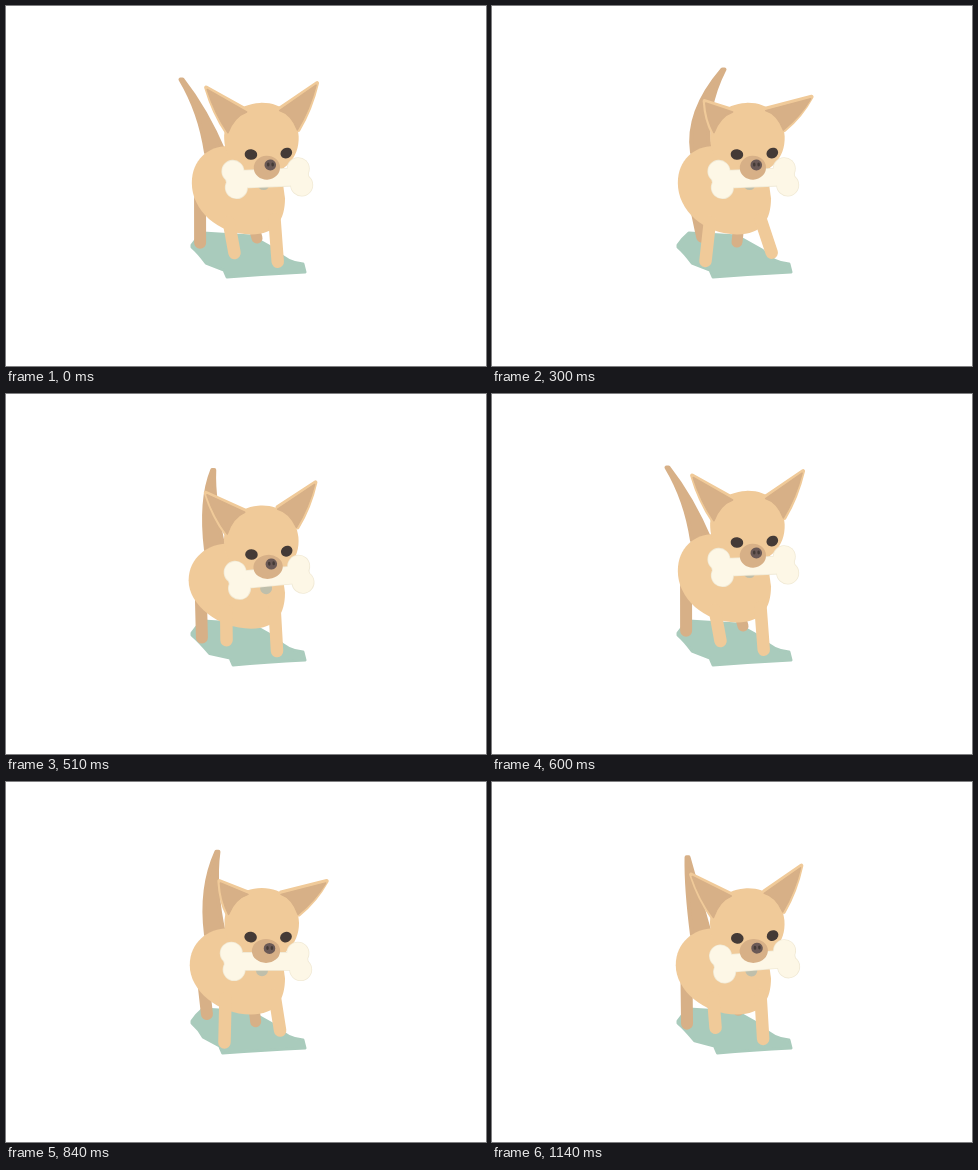
These frames come from a looping animation (480x360 px, 1170 ms). An HTML page with a canvas:

```html
<!DOCTYPE html>
<html lang="en">
<head>
<meta charset="utf-8">
<title>Walking dog</title>
<style>
html, body { margin: 0; width: 100%; height: 100%; overflow: hidden; background: #fff; }
canvas { display: block; }
</style>
</head>
<body>
<canvas id="stage" width="480" height="360"></canvas>
<script>
const ctx = document.getElementById('stage').getContext('2d');

const LOOP = 1170, STEP = 30, STRIDE = 20;
const FUR = '#f0ca99', TAN = '#d7b087', BONE = '#fdf7e6', RIM = '#f1ead6';
const SHADOW = '#a9cbbc', EYE = '#443a36', NOSE = '#6a5956', TAG = '#bfbfab';

// One stride swings the limbs once (swing, reach) and bobs the body twice.
let swing, reach, bob;

function setPhase(step) {
  const angle = 2 * Math.PI * step / STRIDE;
  swing = Math.sin(angle);
  reach = Math.cos(angle);
  bob = Math.cos(2 * angle - 0.44);
}
const move = (base, s, r, b = 0) => base + s * swing + r * reach + b * bob;

function paint(color, trace, edge = 0) {
  ctx.beginPath();
  trace();
  ctx.closePath();
  ctx.fillStyle = ctx.strokeStyle = color;
  ctx.fill();
  if (edge) {
    ctx.lineWidth = edge;
    ctx.lineJoin = 'round';
    ctx.stroke();
  }
}

function oval(color, x, y, rx, ry = rx, turn = 0) {
  paint(color, () => ctx.ellipse(x, y, rx, ry, turn, 0, 2 * Math.PI));
}

function limb(color, x1, y1, x2, y2, width) {
  ctx.beginPath();
  ctx.moveTo(x1, y1);
  ctx.lineTo(x2, y2);
  ctx.strokeStyle = color;
  ctx.lineWidth = width;
  ctx.lineCap = 'round';
  ctx.stroke();
}

function drawShadow() {
  const front = 221 - 7.5 * swing;
  const side = 200 - 4.5 * swing;
  paint(SHADOW, () => {
    ctx.moveTo(186, 239);
    ctx.quadraticCurveTo(190, 233, 197, 227);
    ctx.lineTo(245, 230);
    ctx.lineTo(270, 244);
    ctx.quadraticCurveTo(281, 257, 297, 258);
    ctx.lineTo(299, 266);
    ctx.quadraticCurveTo(260, 268, front, 271);
    ctx.lineTo(front - 3, 264);
    ctx.lineTo(side, 257 - 3 * swing);
    ctx.quadraticCurveTo(193, 247, 186, 241);
  }, 3);
}

function drawTail() {
  const x = move(203.5, -25, -28), y = move(72, 2, 5, -4);
  paint(TAN, () => {
    ctx.moveTo(200, 152 - 6 * bob);
    ctx.quadraticCurveTo(194, 106, x - 1, y);
    ctx.lineTo(x + 1, y);
    ctx.quadraticCurveTo(206 + (x - 203) / 5, 104, 218, 151 - 6 * bob);
  }, 4);
}

function drawBackLegs() {
  const x = move(198.5, -6, -8, 4);
  limb(TAN, x / 2 + 97, 200 - 8 * bob, x, move(236.5, -4, 3, -3), 12);
  limb(TAN, 247, 218, move(248, 7, 3), move(234, 7, -2), 11);
}

function drawBody() {
  const left = 184 + 2 * bob, top = 145.5 - 6 * bob, base = 232 - 4 * bob;
  paint(FUR, () => {
    ctx.moveTo(222, top);
    ctx.bezierCurveTo(202, top, left, top + 14, left, top + 37);
    ctx.bezierCurveTo(left, base - 24, 212, base, 245, base);
    ctx.bezierCurveTo(270, base, 279, base - 15, 279, base - 36);
    ctx.lineTo(276, base - 58);
    ctx.lineTo(270, top);
  });
}

function drawFrontLegs() {
  const x = move(221, 6, 7.5);
  limb(FUR, 220 + (x - 220) / 3, 216, x, move(252.8, 7, -4, -2), 12.5);
  limb(FUR, 268.5, 213, move(273, -3, -4, 3), move(252.5, -1, 4.5, -1.5), 12.5);
}

function drawSkull() {
  const left = -41.5, right = 33, cx = (left + right) / 2;
  const top = -73.7 - 2 * bob, k = 16;
  paint(FUR, () => {
    ctx.moveTo(cx, top);
    ctx.bezierCurveTo(right - k, top, right, top + 14, right, top + 35);
    ctx.bezierCurveTo(right, top + 57, right - k, top + 72, cx, top + 72);
    ctx.bezierCurveTo(left + k, top + 72, left, top + 57, left, top + 35);
    ctx.bezierCurveTo(left, top + 14, left + k, top, cx, top);
  });
}

// side is -1 for the left ear and 1 for the right one; x counts outwards.
function drawEar(side, tipX, innerX, outerX) {
  const tipY = -86 - 7 * reach;
  const trace = inset => () => {
    ctx.moveTo(side * innerX, -69 + inset);
    ctx.lineTo(side * (tipX - inset / 2), tipY + inset);
    ctx.quadraticCurveTo(side * ((tipX + outerX) / 2 + 3 - inset / 2), (tipY - 47) / 2 + 3,
      side * (outerX - inset / 2), -47);
    ctx.quadraticCurveTo(side * (innerX + outerX + 5) / 2, -63, side * innerX, -69 + inset);
  };
  paint(FUR, trace(0), 4);
  paint(TAN, trace(2), 1.5);
}

function drawBone() {
  const half = 32.7 + swing;
  const pass = (color, grow) => {
    limb(color, -half, 0, half, 0, 17 + 2 * grow);
    for (const end of [-half, half])
      for (const side of [-1, 1])
        oval(color, end + 1.4 * side, 8.2 * side, 10.7 + grow);
  };
  oval(TAG, -4, 8.5 - 3 * bob, 6);
  pass(RIM, 0.8);
  pass(BONE, 0);
}

function drawFace() {
  oval(TAN, 0, -10.5, 14 - bob, 12);
  oval(NOSE, 3.5, -13, 5.8, 5.5);
  for (const x of [1.5, 5.9]) oval(EYE, x, -13.5, 1.3, 2);
  oval(EYE, -15.4, -24.3, 6.3, 5.3, 0.15);
  oval(EYE, 20, -24.3, 6, 5.2, -0.45);
}

// The whole head is rigid and rolls around the middle of the bone.
function drawHead() {
  ctx.save();
  ctx.translate(261.3 - 2.2 * swing, 178.5 - 7 * bob);
  ctx.rotate(0.068 * swing - 0.04);
  drawSkull();
  drawEar(-1, 51.5 + 6 * reach, 18, 38.5);
  drawEar(1, 57.5 - 4 * reach, 15, 33);
  drawBone();
  drawFace();
  ctx.restore();
}

function draw(time) {
  setPhase(Math.floor((time % LOOP) / STEP) % STRIDE);
  ctx.fillStyle = '#fff';
  ctx.fillRect(0, 0, 480, 360);
  drawShadow();
  drawTail();
  drawBackLegs();
  drawBody();
  drawFrontLegs();
  drawHead();
}

const start = performance.now();
function tick() {
  draw(performance.now() - start);
  requestAnimationFrame(tick);
}
tick();
</script>
</body>
</html>
```
